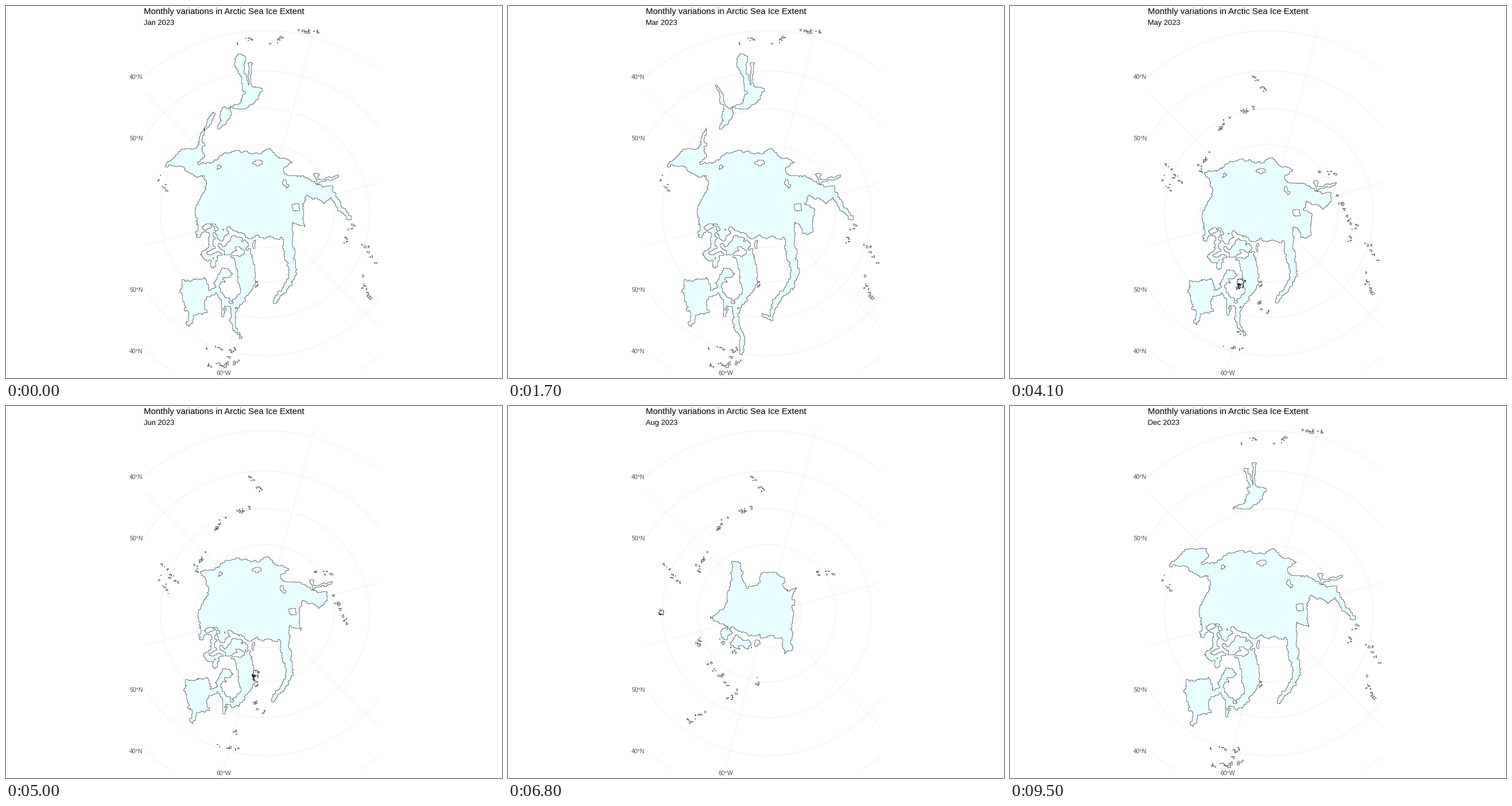
Recreate the animation shown at these times as a matplotlib script. Size 864 by 648 pixels, loop 10 s.

```python
import numpy as np
import matplotlib.pyplot as plt
from matplotlib.animation import FuncAnimation
from matplotlib.patches import Circle, PathPatch
from matplotlib.path import Path

W, H, DPI = 864, 648, 100
LEFT, TOP, RIGHT, BOTTOM = 241, 40, 649, 632
POLE = np.array([451, 361])
RADII = {80: 60, 70: 120, 60: 182, 50: 248, 40: 318}
CELL = 1.35
COLS, ROWS = int((RIGHT - LEFT) / CELL), int((BOTTOM - TOP) / CELL)


def noise(seed, sigma):
    """Smooth random field with unit spread; sigma is in cells."""
    white = np.random.default_rng(seed).standard_normal((ROWS, COLS))
    freq2 = np.fft.fftfreq(ROWS)[:, None] ** 2 + np.fft.fftfreq(COLS) ** 2
    field = np.fft.ifft2(np.fft.fft2(white) * np.exp(-2 * (np.pi * sigma) ** 2 * freq2)).real
    return field / field.std()


# Every shape is sampled on one warped grid, which makes its coast ragged.
GX, GY = np.meshgrid(LEFT + CELL * (np.arange(COLS) + .5),
                     TOP + CELL * (np.arange(ROWS) + .5))
GX += .9 * noise(1, 1.3) + 1.1 * noise(2, 4)
GY += .9 * noise(3, 1.3) + 1.1 * noise(4, 4)
CELLS = np.column_stack([GX.ravel(), GY.ravel()])


def area(*points):
    return Path(points).contains_points(CELLS).reshape(GX.shape)


def lane(start, end, *points):
    """Band along a polyline whose half width goes from start to end."""
    points = np.array(points, float)
    widths = np.linspace(start, end, len(points))
    mask = np.zeros(GX.shape, bool)
    for a, b, wa, wb in zip(points, points[1:], widths, widths[1:]):
        d = b - a
        t = np.clip(((GX - a[0]) * d[0] + (GY - a[1]) * d[1]) / (d @ d), 0, 1)
        mask |= np.hypot(GX - a[0] - t * d[0], GY - a[1] - t * d[1]) < wa + (wb - wa) * t
    return mask


def disc(x, y, rx, ry):
    return np.hypot((GX - x) / rx, (GY - y) / ry) < 1


def specks(*lines):
    """Tiny random-walk islets strewn along straight lines."""
    mask = np.zeros(GX.shape, bool)
    rng = np.random.default_rng(7)
    for x0, y0, x1, y1 in lines:
        for t in rng.random(1 + int(np.hypot(x1 - x0, y1 - y0) / 4.5)):
            x, y = rng.normal((x0 + (x1 - x0) * t, y0 + (y1 - y0) * t), 2.5)
            cell = np.array([(y - TOP) / CELL, (x - LEFT) / CELL], int)
            for _ in range(rng.geometric(.3)):
                row, col = np.clip(cell, 0, (ROWS - 1, COLS - 1))
                mask[row, col] = True
                cell[rng.integers(2)] += rng.choice([-1, 1])
    return mask


def trace(mask):
    """Closed outlines of the filled cells, holes wound the other way."""
    padded = np.pad(mask, 1)
    edges = {}
    for r, c in np.argwhere(mask).tolist():
        corners = [(c, r), (c + 1, r), (c + 1, r + 1), (c, r + 1)]
        outside = [padded[r, c + 1], padded[r + 1, c + 2],
                   padded[r + 2, c + 1], padded[r + 1, c]]
        for i in range(4):
            if not outside[i]:
                edges.setdefault(corners[i], []).append(corners[(i + 1) % 4])
    loops = []
    while edges:
        loop = [next(iter(edges))]
        while len(loop) == 1 or loop[-1] != loop[0]:
            ends = edges[loop[-1]]
            if len(ends) == 1:
                del edges[loop[-1]]
            loop.append(ends.pop())
        loops.append(np.array(loop) * CELL + (LEFT, TOP))
    return loops


# Pack ice and its arms.
basin = area((333, 275), (360, 271), (380, 258), (402, 250), (441, 257), (458, 247),
             (470, 262), (497, 272), (484, 283), (486, 294), (520, 298), (553, 315),
             (568, 312), (568, 334), (553, 341), (522, 330), (517, 345), (521, 386),
             (498, 374), (498, 402), (479, 403), (449, 405), (434, 397), (334, 380),
             (327, 360), (345, 320), (345, 293))
autumn_basin = area((374, 272), (400, 251), (441, 256), (458, 248), (488, 272),
                    (486, 294), (555, 306), (545, 313), (503, 314), (496, 332),
                    (505, 350), (499, 385), (502, 454), (497, 466), (478, 405),
                    (440, 405), (387, 392), (341, 365), (360, 347), (376, 324),
                    (367, 300))
summer_points = np.array([
    (386, 262), (400, 263), (406, 292), (414, 313), (437, 305), (439, 286),
    (466, 283), (486, 300), (492, 319), (508, 310), (498, 333), (506, 350),
    (497, 378), (500, 424), (488, 436), (479, 404), (440, 404), (395, 396),
    (346, 368), (373, 348), (376, 322), (386, 300)])
summer_basin = area(*summer_points)
low_basin = area(*(POLE + (summer_points - POLE) * .93))
channels = area((332, 376), (437, 397), (430, 420), (405, 434), (372, 440), (366, 456),
                (361, 455), (352, 446), (340, 437), (327, 408))
east_channels = lane(10, 6, (376, 398), (404, 420), (430, 412))
greenland = lane(9, 2.5, (489, 395), (496, 440), (500, 468), (486, 493), (466, 514))
greenland_tail = lane(6, 2, (502, 465), (488, 493), (465, 514), (457, 543), (442, 537))
baffin = area((422, 419), (432, 445), (437, 478), (427, 492), (403, 527), (394, 516),
              (410, 495), (402, 470), (396, 434), (408, 426))
hudson = area((308, 478), (345, 474), (354, 490), (345, 514), (346, 533), (324, 542),
              (319, 558), (313, 553), (316, 535), (304, 499))
foxe = (lane(8, 9, (381, 464), (371, 481)) | lane(3, 3, (379, 515), (379, 535))
        | lane(5, 5, (352, 502), (368, 492), (378, 512), (396, 524)))
labrador = lane(5, 2, (397, 524), (394, 545), (400, 562), (408, 578))
labrador_long = lane(6, 4, (397, 524), (397, 550), (409, 580), (408, 602))
bering = area((275, 281), (290, 263), (305, 250), (345, 247), (346, 262), (334, 270),
              (346, 295), (328, 296), (318, 290), (306, 278), (290, 277))
anadyr = lane(4, 2, (340, 247), (338, 235), (344, 214))
barents = lane(13, 11, (520, 358), (521, 387))
pechora = lane(5, 3, (568, 330), (580, 348), (599, 368))
yamal = lane(3, 2, (541, 293), (543, 305), (562, 300), (579, 296))

# Separate floes in the Sea of Okhotsk and along Kamchatka.
okhotsk = area((418, 139), (448, 143), (434, 168), (420, 177), (388, 183), (404, 170),
               (417, 153))
sakhalin = lane(8, 4, (407, 92), (406, 108), (419, 147))
sakhalin_short = lane(3, 4, (409, 109), (420, 147))
tatar = lane(3, 2, (425, 102), (423, 138))
shelikhov = lane(9, 2, (381, 187), (378, 200), (369, 213))
kamchatka = lane(2, 3, (363, 138), (380, 182))
east_coast = lane(3, 2.5, (361, 188), (354, 205), (344, 214))

# Islets.
japan = specks((400, 68, 428, 56), (462, 68, 486, 50), (505, 43, 550, 49))
baltic = specks((603, 380, 590, 415), (622, 412, 645, 450), (618, 470, 632, 510))
gulf = specks((346, 596, 376, 596), (346, 626, 414, 619), (404, 593, 386, 610))
coasts = specks((267, 296, 279, 322), (433, 470, 437, 490))
spring = specks((424, 122, 446, 152), (363, 215, 380, 192), (398, 185, 425, 180),
                (270, 275, 300, 310), (343, 250, 328, 293), (535, 292, 570, 292))
warm = specks((572, 330, 596, 385), (432, 518, 453, 541), (397, 560, 402, 570),
              (374, 590, 404, 598))
thaw = specks((330, 402, 336, 420), (348, 444, 385, 488), (365, 405, 398, 430),
              (313, 553, 346, 530), (434, 470, 434, 490), (386, 515, 400, 490))

rocks = (disc(438, 272, 9, 4) | disc(370, 282, 3, 4) | disc(488, 310, 3, 8)
         | disc(505, 351, 6, 7) | disc(346, 404, 9, 11) | disc(350, 384, 8, 5))
land = rocks | ((channels | east_channels) & (noise(5, 2.3) > .15)) | (foxe & (noise(6, 2) > 1.1))
polynya = disc(415, 277, 10, 13)

FLOE_SINK = (360, 300)


class Month:
    def __init__(self, name, pack, floes, sink=(412, 500), seed=(400, 490)):
        self.label = name + " 2023"
        self.sink, self.seed = sink, seed
        main = np.any(pack, axis=0) & ~land
        self.main = trace(main)
        self.floes = trace(np.any(floes, axis=0) & ~main)
        self.centres = np.array([f[:-1].mean(axis=0) for f in self.floes])
        self.loops = self.main + self.floes
        self.verts = np.concatenate(self.loops)
        self.codes = np.concatenate([
            [Path.MOVETO] + [Path.LINETO] * (len(p) - 2) + [Path.CLOSEPOLY]
            for p in self.loops])

    def anchors(self, other, main_anchor):
        """Where every vertex collapses to while the other month takes over."""
        points = [main_anchor] * len(self.main)
        for floe, centre in zip(self.floes, self.centres):
            dist = np.hypot(*(other.centres - centre).T)
            points.append(FLOE_SINK if len(floe) > 60 else other.centres[dist.argmin()])
        return np.repeat(points, [len(p) for p in self.loops], axis=0)

    def path(self, weight=1, anchors=0):
        return Path(self.verts * weight + np.asarray(anchors) * (1 - weight), self.codes)


arctic = [basin, greenland, channels, foxe, hudson, baffin, yamal]
winter = arctic + [pechora, bering]
peak = winter + [labrador_long, greenland_tail]
fringe = [japan, baltic, gulf, coasts]
far_east = [okhotsk, tatar, shelikhov]

# The pack leaves a month towards its sink; the next one grows out of its seed.
MONTHS = [
    Month("Jan", winter + [labrador, anadyr], fringe + far_east + [sakhalin, east_coast]),
    Month("Feb", peak + [anadyr], fringe + far_east + [sakhalin, east_coast, kamchatka],
          sink=(400, 552), seed=(403, 622)),
    Month("Mar", peak + [anadyr, barents], fringe + far_east + [sakhalin, kamchatka]),
    Month("Apr", peak + [barents], fringe + far_east + [kamchatka]),
    Month("May", arctic + [barents, labrador], [spring, warm, baltic, coasts]),
    Month("Jun", arctic, [spring, warm, coasts], sink=(412, 470), seed=(435, 474)),
    Month("Jul", [autumn_basin, channels, foxe], [spring, warm, thaw]),
    Month("Aug", [summer_basin, east_channels], [spring, thaw],
          sink=(435, 380), seed=(256, 360)),
    Month("Sep", [low_basin, east_channels], [spring, thaw]),
    Month("Oct", [autumn_basin & ~polynya, yamal, east_channels], [spring, thaw],
          sink=(435, 475), seed=(352, 473)),
    Month("Nov", [basin, greenland, channels, foxe, yamal], [spring, thaw, baltic]),
    Month("Dec", winter, fringe + [okhotsk, sakhalin_short, tatar])]
LINKS = [(a.anchors(b, a.sink), b.anchors(a, a.seed)) for a, b in zip(MONTHS, MONTHS[1:])]

# First frame of each change: nine frames apart, then eight once summer ends.
STARTS = [5 + 9 * k - max(0, k - 7) for k in range(11)]

fig = plt.figure(figsize=(W / DPI, H / DPI), dpi=DPI, facecolor="white")
ax = fig.add_axes([LEFT / W, 1 - BOTTOM / H, (RIGHT - LEFT) / W, (BOTTOM - TOP) / H])
ax.set(xlim=(LEFT, RIGHT), ylim=(BOTTOM, TOP))
ax.axis("off")


def text(x, y, string, px, color="black", ha="left"):
    return fig.text(x / W, 1 - y / H, string, fontsize=px * 72 / DPI, color=color,
                    ha=ha, va="baseline", family="Liberation Sans")


for radius in RADII.values():
    ax.add_patch(Circle(POLE, radius, fill=False, ec="#ebebeb", lw=.55))
for angle in np.radians([15, 75, 135]):
    arm = 500 * np.array([np.cos(angle), -np.sin(angle)])
    ax.plot(*np.array([POLE - arm, POLE + arm]).T, color="#ebebeb", lw=.55)

text(240, 14, "Monthly variations in Arctic Sea Ice Extent", 15.05)
subtitle = text(240, 33.4, "", 12.9)
for lat in (40, 50):
    rise = np.sqrt(RADII[lat] ** 2 - (POLE[0] - LEFT) ** 2)
    for side in (-1, 1):
        text(238.5, POLE[1] + side * rise + 4.8, f"{lat}°N", 10.5, "#4d4d4d", "right")
text(379.7, 643, "60°W", 10.5, "#4d4d4d", "center")

ice = [ax.add_patch(PathPatch(MONTHS[0].path(), fc=(.878, 1, 1, .72), ec="#1c1c1c",
                              lw=.4, zorder=3 + i)) for i in range(2)]


def ease(t):
    return 4 * t ** 3 if t < .5 else 1 - 4 * (1 - t) ** 3


def draw(frame):
    done = sum(frame >= s + 3 for s in STARTS)
    progress = 0
    if done < len(STARTS) and frame >= STARTS[done]:
        progress = ease((frame - STARTS[done] + 1) / 4)
    current = MONTHS[done]
    ice[1].set_visible(progress > 0)
    if progress:
        following = MONTHS[done + 1]
        leave, arrive = LINKS[done]
        ice[0].set_path(current.path(1 - progress, leave))
        ice[1].set_path(following.path(progress, arrive))
        if progress >= .5:
            current = following
    else:
        ice[0].set_path(current.path())
    ice[0].set_snap(progress < .1)
    ice[1].set_snap(progress > .9)
    subtitle.set_text(current.label)
    return [*ice, subtitle]


animation = FuncAnimation(fig, draw, frames=100, interval=100, repeat=True,
                          repeat_delay=0, blit=False)
plt.show()
```
